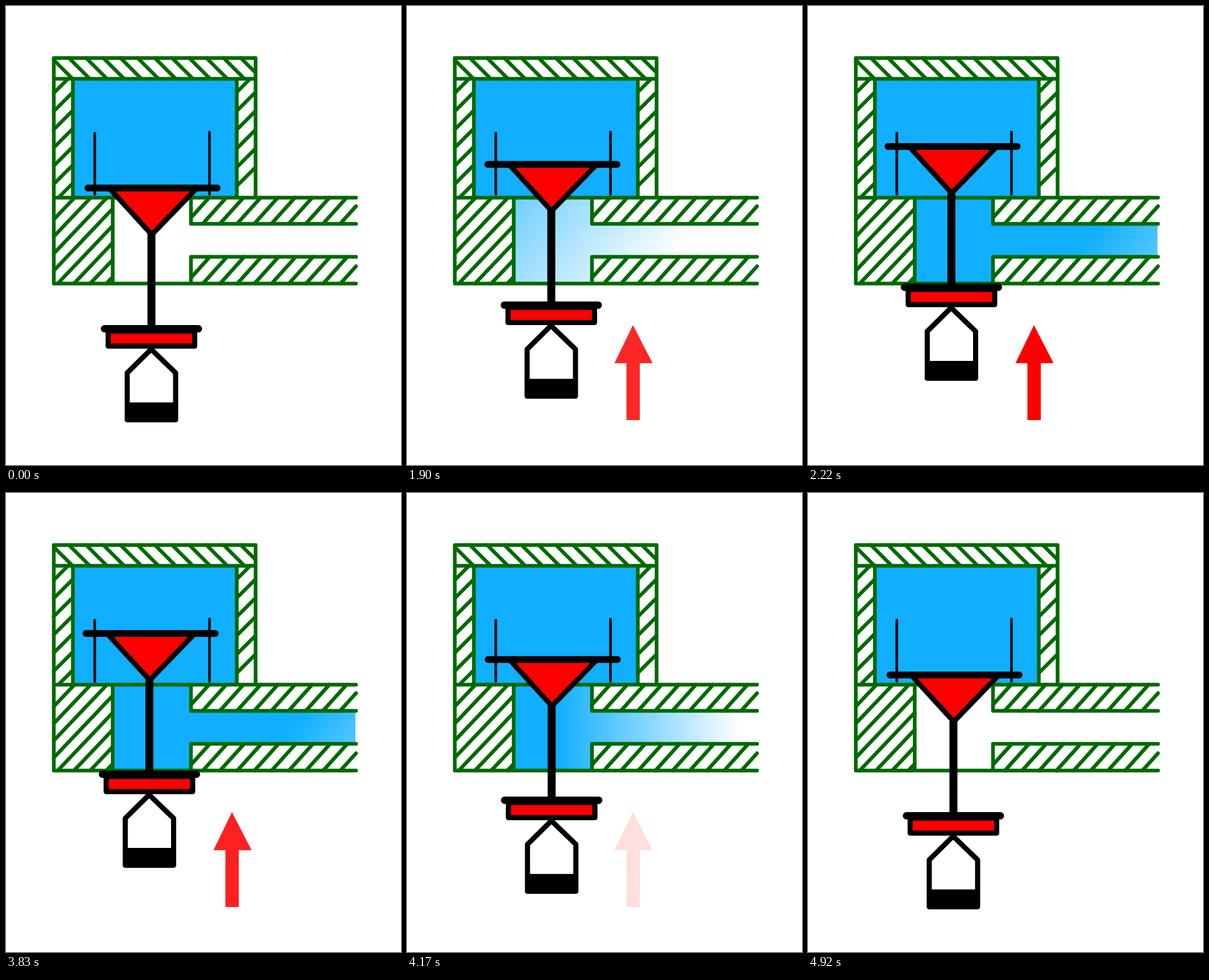
Recreate the animation shown at these times as an HTML page. Size 694 px wide and 807 px high, loop 5500 ms.

```html
<!DOCTYPE html>
<html lang="en">
<head>
<meta charset="utf-8">
<title>Valve</title>
<style>
  html, body { margin: 0; width: 100%; height: 100%; overflow: hidden; background: #fff; }
  svg { display: block; }
  .wall { fill: none; stroke: #006a00; stroke-width: 6.5; }
  .valve { fill: none; stroke: #000; stroke-width: 9; }
  svg * { stroke-linecap: round; stroke-linejoin: round; }
</style>
</head>
<body>
<svg width="694" height="807" viewBox="0 0 694 807">
  <defs>
    <linearGradient id="flow" gradientUnits="userSpaceOnUse">
      <stop offset="0" stop-color="#11afff"/>
      <stop offset="1" stop-color="#11afff" stop-opacity="0"/>
    </linearGradient>
  </defs>
  <path fill="#11afff" d="M117 128H405V337H117z"/>
  <path id="water" fill="url(#flow)" d="M187 337H325V383H614V441H325V488H187z"/>
  <path class="wall" d="M615 488H84V91.5H438.5V337M84 128H438.5M117.5 128V337M405.5 128V337M84 337H615M187.5 337V488M325 337V383H615M325 488V441H615"/>
  <path class="wall" id="hatch"/>
  <path d="M156 223.500V331M357.500 221.500V331" stroke="#000" stroke-width="4.500"/>
  <g id="valve" class="valve">
    <path d="M182 321H334.500L256 402z" fill="#f00"/>
    <path d="M144 320H371" stroke-width="12"/>
    <path d="M255.500 402V566" stroke-width="14"/>
    <path d="M179.500 571.500H331.500V598H179.500z" fill="#f00"/>
    <path d="M173 567.500H338" stroke-width="13"/>
    <path d="M213 700V645L255 603.500L298 645V700"/>
    <path d="M213 701.500H298V727.500H213z" fill="#000"/>
  </g>
  <path id="arrow" fill="#f00" d="M397 561L431.500 628H409V728H385.500V628H364.500z"/>
</svg>
<script>
const $ = id => document.getElementById(id);
const LOOP = 5500, RISE = 1580, FALL = 3830, TRAVEL = 73;

// Diagonals x = c - k*y cut to a box; k > 0 leans like "/", k < 0 like "\".
function hatch(x0, y0, x1, y1, k, first, gap, count) {
  let d = '';
  for (let i = 0; i < count; i++) {
    const c = first + gap * i;
    const top = Math.max(y0, (c - (k > 0 ? x1 : x0)) / k);
    const low = Math.min(y1, (c - (k > 0 ? x0 : x1)) / k);
    d += `M${c - k * top} ${top}L${c - k * low} ${low}`;
  }
  return d;
}

$('hatch').setAttribute('d',
  hatch(84, 91.5, 438.5, 128, -1, -11, 30.2, 12) +
  hatch(84, 128, 117.5, 337, 1, 237, 32, 7) +
  hatch(405.5, 128, 438.5, 337, 1, 557, 33, 6) +
  hatch(84, 337, 187.5, 488, 0.95, 440.5, 28.5, 8) +
  hatch(325, 337, 615, 383, 0.9, 660, 30.2, 10) +
  hatch(325, 441, 615, 488, 0.9, 755, 30.2, 10));

const clamp = v => Math.min(1, Math.max(0, v));

// Water is solid up to `full`, gone past `end`, along the direction (1, tilt).
function setFlow(full, end, tilt) {
  const n = 1 + tilt * tilt, g = $('flow');
  const at = (name, v) => g.setAttribute(name, v);
  at('x1', 190 + full / n);
  at('y1', 340 + full * tilt / n);
  at('x2', 190 + end / n);
  at('y2', 340 + end * tilt / n);
}

function draw(now) {
  const t = now % LOOP;
  let lift = 0, alpha = 0, wet = false;
  if (t >= FALL) {
    const s = Math.min(8, Math.floor((t - FALL) / 83.3));
    lift = (1 - s / 8) ** 1.42;
    alpha = clamp(0.87 - 0.185 * s);
    wet = s < 8;
    setFlow(370 - 74 * s, 840 - 111 * s, Math.max(-0.3, 0.8 - 0.2 * s));
  } else if (t >= RISE) {
    const s = Math.min(8, Math.floor((t - RISE) / 80));
    lift = clamp(s / 6) ** 1.39;
    alpha = clamp(0.15 + 0.175 * s);
    wet = s > 0;
    setFlow(150 * s - 840, 120 * s - 122, 0.8);
  }
  const y = -TRAVEL * lift;
  $('valve').setAttribute('transform', `translate(${0.048 * y} ${y})`);
  $('arrow').setAttribute('opacity', alpha);
  $('water').setAttribute('visibility', wet ? 'visible' : 'hidden');
  requestAnimationFrame(draw);
}
draw(performance.now());
</script>
</body>
</html>
```
